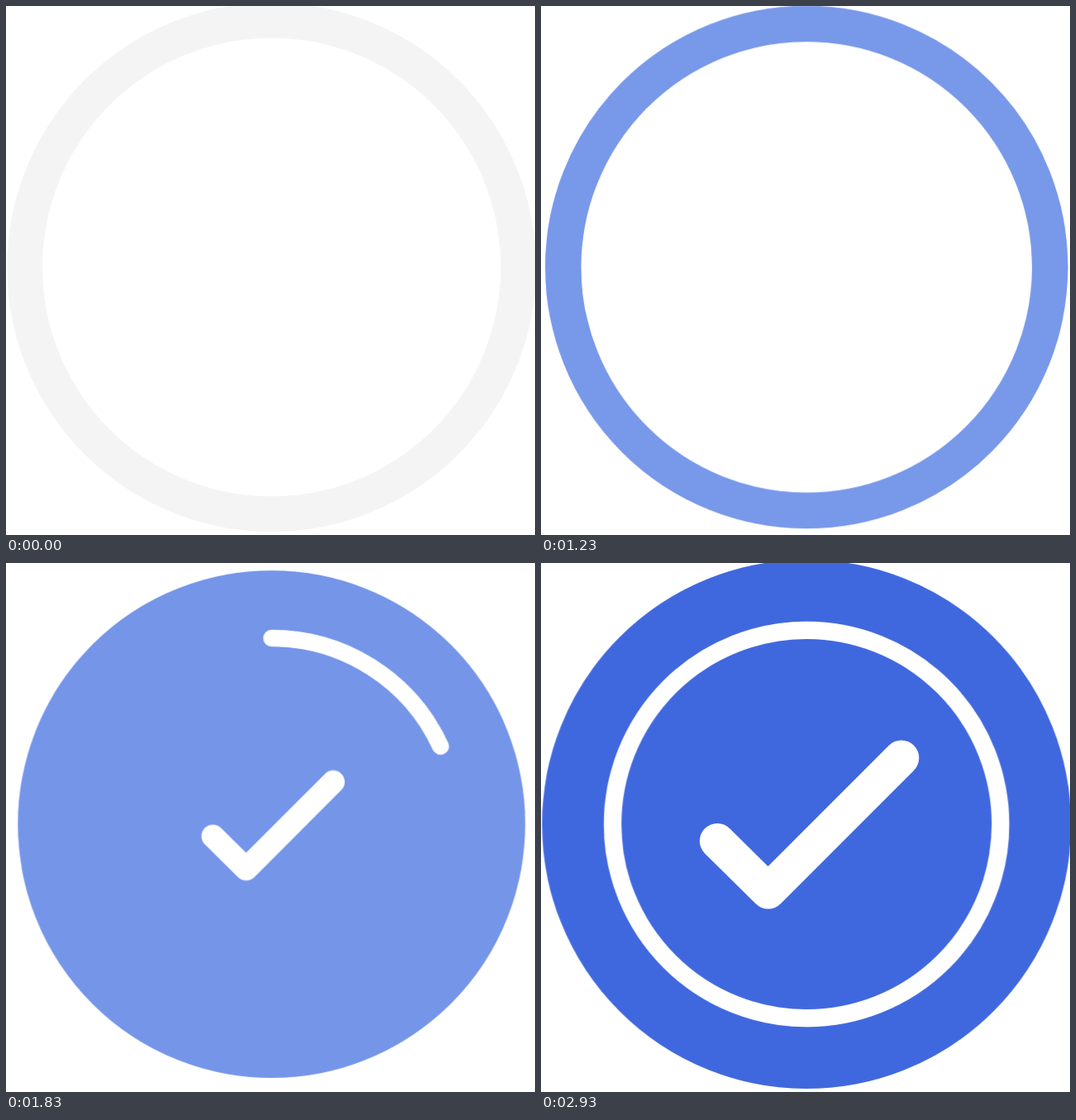
Animation of 640x640 px, one loop 3610 ms. Source, as an HTML page:

```html
<!DOCTYPE html>
<html lang="en">
<head>
<meta charset="utf-8">
<title>Progress to done</title>
<style>
  html, body { margin: 0; width: 100%; height: 100%; overflow: hidden; background: #fff; }
  svg { display: block; width: 640px; height: 640px; }
  circle, path { fill: none; stroke-linecap: round; stroke-linejoin: round; }
  .badge, .disc, .arc, .check { animation: 3.61s linear infinite; }
  .track { stroke: #f4f4f4; stroke-width: 42.67px; }
  .disc, .arc { stroke-dasharray: 1 2; }
  .disc { animation-name: load, fill, tint; }
  .arc { stroke: #fff; stroke-width: 21.33px; animation-name: trace; }
  .badge { animation-name: press; }
  .check { stroke: #fff; stroke-width: 42.67px; animation-name: pop; }

  /* blue ring runs around the track */
  @keyframes load {
    0%, .8% { stroke-dashoffset: 1.001; }
    .81% { stroke-dashoffset: .975; }
    32.964%, 100% { stroke-dashoffset: 0; }
  }
  /* ring thickens inwards until it is a disc */
  @keyframes fill {
    0%, 33.241% {
      r: 298.67px; stroke-width: 42.67px;
      animation-timing-function: cubic-bezier(.333, 0, .667, .333);
    }
    45.429%, 100% { r: 160px; stroke-width: 320px; }
  }
  @keyframes tint {
    0%, 46.26% { stroke: #7898ea; animation-timing-function: ease-in-out; }
    73.961%, 100% { stroke: #4068de; }
  }
  @keyframes press {
    0%, 33.102% { transform: scale(1); animation-timing-function: ease; }
    41.828% { transform: scale(.9); animation-timing-function: ease-in-out; }
    57.895%, 100% { transform: scale(1); }
  }
  /* white ring is drawn in two runs */
  @keyframes trace {
    0%, 39.611% { stroke-dashoffset: 1.001; }
    39.612% {
      stroke-dashoffset: 1;
      animation-timing-function: cubic-bezier(.333, .02, .667, .24);
    }
    60.388% {
      stroke-dashoffset: .291;
      animation-timing-function: cubic-bezier(.333, 0, .667, .05);
    }
    81.163%, 100% { stroke-dashoffset: 0; }
  }
  @keyframes pop {
    0%, 40.443% { transform: scale(0); animation-timing-function: ease; }
    66.205%, 100% { transform: scale(1); }
  }
</style>
</head>
<body>
<svg viewBox="0 0 640 640">
  <g transform="translate(321.3 316)">
    <g class="badge">
      <g transform="rotate(-90)">
        <circle class="track" r="298.67"/>
        <circle class="disc" r="298.67" pathLength="1"/>
        <circle class="arc" r="234.67" pathLength="1"/>
      </g>
      <g transform="translate(-1.3 4)">
        <path class="check" d="M-106.7 16.3L-45.2 77.2L116 -84.2"/>
      </g>
    </g>
  </g>
</svg>
</body>
</html>
```
